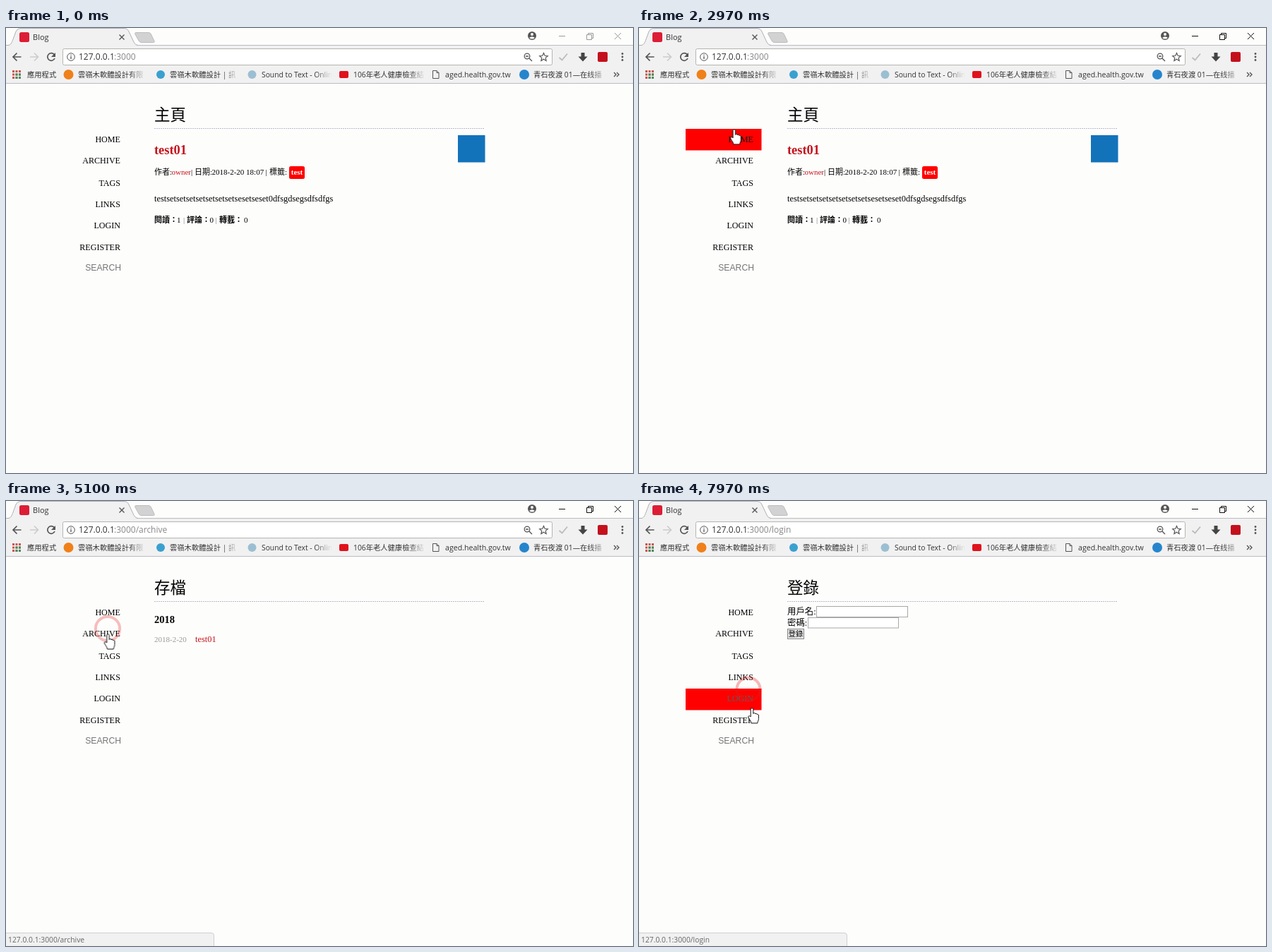
An HTML page that plays this animation: 888x631 px, repeating every 8 s.

```html
<!DOCTYPE html>
<html lang="zh-Hant">
<head>
<meta charset="utf-8">
<title>Blog</title>
<style>
html, body { margin: 0; width: 100%; height: 100%; overflow: hidden; background: #fdfdfc; }
svg { display: block; width: 888px; height: 631px; }
text { white-space: pre; }
.ui { font-family: "Open Sans", "Noto Sans CJK TC", "Noto Sans CJK", sans-serif; fill: #333; }
.doc { font-family: "Liberation Serif", "Noto Sans CJK TC", "Noto Sans CJK", serif; fill: #000; }
.line { fill: none; stroke: #555; }
.marks { font-size: 10.3px; }
.url { font-size: 12px; fill: #888; }
.hint text { font-size: 10.3px; fill: #666; }
.menu { font-size: 12.1px; text-anchor: end; }
.title { font-size: 22.5px; }
.meta { font-size: 11px; }
.body { font-size: 12.4px; }
.red { fill: #c4141c; }
.bold { font-weight: 700; }
.box { fill: #fff; stroke: #a9a9a9; }
.hot rect { fill: #f00; }

.home, .archive, .tags, .links, .login, .busy, .focus, .arrow, .hand, .hint, .hint g, .hot {
  visibility: hidden;
  animation: 8s step-end infinite;
}
.home { animation-name: home; }
.archive { animation-name: archive; }
.tags { animation-name: tags; }
.links { animation-name: links; }
.login { animation-name: login; }
.busy { animation-name: busy; }
.focus { animation-name: focus; }
.arrow { animation-name: arrow; }
.hand { animation-name: hand; }
.hint { animation-name: hint; }
.over-home { animation-name: over-home; }
.over-archive { animation-name: over-archive; }
.over-tags { animation-name: over-tags; }
.over-links { animation-name: over-links; }
.over-login { animation-name: over-login; }
.hot text { animation: 8s linear infinite; }
.over-home text { animation-name: ink-home; }
.over-archive text { animation-name: ink-archive; }
.over-tags text { animation-name: ink-tags; }
.over-links text { animation-name: ink-links; }
.over-login text { animation-name: ink-login; }

@keyframes home { 0% { visibility: visible } 61%, 100% { visibility: hidden } }
@keyframes archive { 0% { visibility: hidden } 61% { visibility: visible } 74.4%, 100% { visibility: hidden } }
@keyframes tags { 0% { visibility: hidden } 74.4% { visibility: visible } 84.5%, 100% { visibility: hidden } }
@keyframes links { 0% { visibility: hidden } 84.5% { visibility: visible } 97%, 100% { visibility: hidden } }
@keyframes login { 0% { visibility: hidden } 97%, 100% { visibility: visible } }
@keyframes focus { 0% { visibility: hidden } 26.1%, 100% { visibility: visible } }
@keyframes busy {
  0%, 32%, 48.1%, 61%, 74.4%, 84.5%, 97%, 100% { visibility: hidden }
  29.75%, 43.375%, 59.9%, 72.9%, 83.5%, 96.1% { visibility: visible }
}
@keyframes arrow {
  0%, 14.125%, 37.1%, 48.1%, 100% { visibility: hidden }
  7.875%, 17.2%, 43.375% { visibility: visible }
}
@keyframes hand {
  0%, 17.2%, 43.375% { visibility: hidden }
  14.125%, 37.1%, 48.1%, 100% { visibility: visible }
}
@keyframes hint {
  0%, 22.9% { visibility: hidden }
  16.8%, 37.9%, 100% { visibility: visible }
}
@keyframes over-home {
  0%, 17.2%, 51.6%, 100% { visibility: hidden }
  14.125%, 37.1% { visibility: visible }
}
@keyframes over-archive { 0%, 61%, 100% { visibility: hidden } 51.6% { visibility: visible } }
@keyframes over-tags { 0%, 74.4%, 100% { visibility: hidden } 65.7% { visibility: visible } }
@keyframes over-links { 0%, 84.5%, 100% { visibility: hidden } 76.7% { visibility: visible } }
@keyframes over-login { 0%, 97% { visibility: hidden } 87.3%, 97.5%, 100% { visibility: visible } }
@keyframes ink-home {
  0%, 14.125%, 17.21%, 37.1% { fill: #111 }
  17.2% { fill: #888 }
  43.3%, 100% { fill: #fff }
}
@keyframes ink-archive { 0%, 51.6% { fill: #111 } 57.8%, 100% { fill: #fff } }
@keyframes ink-tags { 0%, 65.7% { fill: #111 } 72%, 100% { fill: #fff } }
@keyframes ink-links { 0%, 76.9% { fill: #111 } 83%, 100% { fill: #fff } }
@keyframes ink-login { 0%, 87.3%, 97.5% { fill: #111 } 93.5%, 97% { fill: #fff } 100% { fill: #6a6a6a } }

/* status texts stay a little longer than the highlights */
.hint .over-home { animation-name: hint-home; }
.hint .over-archive { animation-name: hint-archive; }
.hint .over-tags { animation-name: hint-tags; }
.hint .over-links { animation-name: hint-links; }
.hint .over-login { animation-name: hint-login; }
@keyframes hint-home { 0%, 22.9%, 51.6%, 100% { visibility: hidden } 16.8%, 37.9% { visibility: visible } }
@keyframes hint-archive { 0%, 65.7%, 100% { visibility: hidden } 51.6% { visibility: visible } }
@keyframes hint-tags { 0%, 76.7%, 100% { visibility: hidden } 65.7% { visibility: visible } }
@keyframes hint-links { 0%, 87.3%, 100% { visibility: hidden } 76.7% { visibility: visible } }
@keyframes hint-login { 0% { visibility: hidden } 87.3%, 100% { visibility: visible } }

.cursor { animation: move 8s linear infinite; fill: #fff; stroke: #111; stroke-linejoin: round; }
@keyframes move {
  0%, 7.875% { transform: translate(522px, 590px) }
  10%, 12.125% { transform: translate(278px, 299px) }
  14.25% { transform: translate(166px, 170px) }
  15.625%, 16.5% { transform: translate(154.5px, 158px) }
  22.125%, 32.875% { transform: translate(62px, 37px) }
  37.5% { transform: translate(141px, 153px) }
  43.375%, 49.375% { transform: translate(141px, 155px) }
  52.5%, 60.6% { transform: translate(144px, 181px) }
  63.25%, 64.125% { transform: translate(144.5px, 189px) }
  66.625%, 75.25% { transform: translate(147px, 213px) }
  77.6%, 84.75% { transform: translate(154.5px, 249px) }
  87.5%, 97% { transform: translate(156px, 267px) }
  99.25%, 100% { transform: translate(160px, 294px) }
}

.rings circle {
  fill: none; stroke: #e81c1c; stroke-width: 4; opacity: 0;
  animation: ring 8s linear infinite;
}
@keyframes ring {
  0% { r: 7px; opacity: .75 }
  6.5% { r: 22px; opacity: .06 }
  6.51%, 100% { r: 22px; opacity: 0 }
}
.spin { transform-origin: 26px 13px; animation: spin 1s linear infinite; }
@keyframes spin { to { transform: rotate(360deg) } }
</style>
</head>
<body>
<svg viewBox="0 0 888 631">
  <defs>
    <linearGradient id="fade">
      <stop offset="0" stop-color="#f1f1f2" stop-opacity="0"/>
      <stop offset="1" stop-color="#f1f1f2"/>
    </linearGradient>
    <rect id="veil" y="58" width="24" height="17" fill="url(#fade)"/>
    <path id="controls" d="M783 11.5H792M822.5 9.5H829.5V16.5H822.5ZM824.5 9.5V7.5H831.5V14.5H829.5M862 7L871 16M871 7L862 16" fill="none"/>
  </defs>
  <rect width="888" height="631" fill="#fdfdfc"/>

  <!-- browser frame -->
  <g class="ui">
    <rect y="25" width="888" height="54" fill="#f1f1f2"/>
    <path d="M0 24.5H888M0 78.5H888" fill="none" stroke="#bcbcc2"/>
    <path d="M0 25H3C7 24 8 21 10 16L14 5Q16 .5 20 .5H167Q172 .5 174 5L181 20Q183 24.5 187 25V26H0Z" fill="#f1f1f2"/>
    <path d="M0 24.5H3C7 24 8 21 10 16L14 5Q16 .5 20 .5H167Q172 .5 174 5L181 20Q183 24.5 187 24.5" fill="none" stroke="#b0b0b4"/>
    <path d="M184 6.5H202Q204.5 6.5 205.5 9L210 18.5Q211 20.5 208.5 20.5H192Q189 20.5 188 18L183 9Q182 6.5 184 6.5Z" fill="#d2d2d3" stroke="#bcbcc0"/>
    <rect x="19" y="6" width="14" height="14" rx="2.5" fill="#dd1d35"/>
    <text x="38" y="17" font-size="11">Blog</text>
    <path d="M160.5 9.5L167.5 16.5M167.5 9.5L160.5 16.5" class="line" stroke-width="1.4"/>

    <circle cx="745" cy="11" r="6" fill="#555"/>
    <circle cx="745" cy="9" r="2" fill="#fdfdfd"/>
    <path d="M741 14Q745 10.5 749 14Q745 17 741 14Z" fill="#fdfdfd"/>
    <use href="#controls" stroke="#999"/>
    <use href="#controls" stroke="#111" class="focus"/>

    <g class="line" stroke-width="1.7">
      <path d="M21.5 41H10M15.5 35.5L10 41L15.5 46.5"/>
      <path d="M34 41H45.5M40 35.5L45.5 41L40 46.5" stroke="#ccc"/>
      <path d="M68.5 38A5.3 5.3 0 1 0 69 43"/>
    </g>
    <path d="M70 35V41H64Z" fill="#555"/>
    <rect x="80.5" y="29.5" width="693" height="23" rx="2" fill="#fff" stroke="#b4b4ae"/>
    <circle cx="92" cy="41" r="5.3" class="line"/>
    <path d="M92 40V44M92 37.7V39" class="line" stroke-width="1.3"/>
    <circle cx="738" cy="40" r="3.8" class="line" stroke-width="1.3"/>
    <path d="M741 43L745 47M736 40H740" class="line" stroke-width="1.4"/>
    <path d="M761.5 35.5L763.2 39.3L767.3 39.7L764.2 42.4L765.1 46.5L761.5 44.3L757.9 46.5L758.8 42.4L755.7 39.7L759.8 39.3Z" class="line" stroke-width="1.2"/>
    <path d="M783.5 42L787.5 45.5L795 36.5" fill="none" stroke="#bbb" stroke-width="1.8"/>
    <path d="M814.5 35H819.5V40.5H823.5L817 47.5L810.5 40.5H814.5Z" fill="#444"/>
    <rect x="838" y="34" width="14" height="14" rx="2" fill="#c4101c"/>
    <g fill="#555"><circle cx="873" cy="36.5" r="1.4"/><circle cx="873" cy="41" r="1.4"/><circle cx="873" cy="45.5" r="1.4"/></g>
    <text x="103" y="45" font-size="12">127.0.0.1</text>
  </g>

  <!-- bookmarks -->
  <g class="ui marks">
    <path d="M9 61.5H21M9 66H21M9 70.5H21" fill="none" stroke="#c9574c" stroke-width="3" stroke-dasharray="3 1.5"/>
    <path d="M13.5 66H21M13.5 70.5H21" fill="none" stroke="#4a8a5a" stroke-width="3" stroke-dasharray="3 1.5"/>
    <text x="30" y="70">應用程式</text>
    <circle cx="88.5" cy="66" r="7" fill="#f08019"/>
    <text x="102" y="70">雲嶺木軟體設計有限</text>
    <circle cx="219" cy="66" r="6" fill="#3aa0d0"/>
    <text x="232" y="70">雲嶺木軟體設計 | 訊</text>
    <circle cx="348.5" cy="66" r="6" fill="#9bbfd2"/>
    <text x="362" y="70">Sound to Text - Onlin</text>
    <rect x="472" y="61" width="13" height="10" rx="2" fill="#e0121c"/>
    <text x="492" y="70">106年老人健康檢查結</text>
    <path d="M604.5 60.5H610L613 63.5V71.5H604.5ZM610 60.5V63.5H613" class="line"/>
    <text x="622" y="70" font-size="10.6">aged.health.gov.tw</text>
    <circle cx="734" cy="66" r="7" fill="#2585cc"/>
    <text x="747" y="70" lang="zh-Hans">青石夜渡 01—在线播</text>
    <use href="#veil" x="174"/>
    <use href="#veil" x="306"/>
    <use href="#veil" x="438"/>
    <use href="#veil" x="570"/>
    <use href="#veil" x="826"/>
    <path d="M861 63L864 66L861 69M865 63L868 66L865 69" class="line" stroke-width="1.4"/>
  </g>

  <g class="busy">
    <rect x="18" y="5" width="16" height="16" fill="#f1f1f2"/>
    <path class="spin" d="M25 8.2A5 5 0 0 1 27 8.2" fill="none" stroke="#888" stroke-width="1.3"/>
    <rect x="56" y="33" width="16" height="16" fill="#f1f1f2"/>
    <path d="M59 36L69 46M69 36L59 46" class="line" stroke-width="1.7"/>
  </g>

  <!-- pages -->
  <path d="M210 142.5H678" fill="none" stroke="#b9b9d2" stroke-dasharray="2 1"/>
  <g class="home doc">
    <text x="153" y="45" class="ui url">:3000</text>
    <text x="210" y="131" class="title">主頁</text>
    <rect x="640" y="152" width="38.5" height="38.5" fill="#1373ba"/>
    <text x="210" y="179" class="red bold" font-size="18.4">test01</text>
    <g class="meta">
      <text x="210" y="208">作者:</text>
      <text x="234.5" y="208" class="red">owner</text>
      <text x="262" y="208">|</text>
      <text x="267" y="208">日期:</text>
      <text x="291.5" y="208">2018-2-20 18:07</text>
      <text x="367.5" y="208">|</text>
      <text x="373" y="208">標籤:</text>
      <rect x="401" y="196" width="22" height="18" rx="2.5" fill="#f00"/>
      <text x="403.8" y="208" class="bold" fill="#fff">test</text>
    </g>
    <text x="210" y="246" class="body">testsetsetsetsetsetsetsetsesetseset0dfsgdsegsdfsdfgs</text>
    <g class="meta">
      <text x="210" y="276" class="bold">閱讀：</text>
      <text x="242" y="276">1</text>
      <text x="251" y="276" fill="#777">|</text>
      <text x="256" y="276" class="bold">評論：</text>
      <text x="288.5" y="276">0</text>
      <text x="296.5" y="276" fill="#777">|</text>
      <text x="302" y="276" class="bold">轉載：</text>
      <text x="337" y="276">0</text>
    </g>
  </g>
  <g class="archive doc">
    <text x="153" y="45" class="ui url">:3000/archive</text>
    <text x="210" y="131" class="title">存檔</text>
    <text x="210" y="173" class="bold" font-size="14.5">2018</text>
    <text x="210" y="200" class="meta" fill="#999">2018-2-20</text>
    <text x="268" y="200" class="body red">test01</text>
  </g>
  <g class="tags doc">
    <text x="153" y="45" class="ui url">:3000/tags</text>
    <text x="210" y="131" class="title">標籤</text>
    <rect x="221" y="151" width="23" height="13" rx="2" fill="#e80000"/>
    <text x="225" y="160.5" font-size="9.5" font-family="Liberation Sans, sans-serif" fill="#fff">test</text>
  </g>
  <g class="links doc">
    <text x="153" y="45" class="ui url">:3000/links</text>
    <text x="210" y="131" class="title">連結</text>
  </g>
  <g class="login doc">
    <text x="153" y="45" class="ui url">:3000/login</text>
    <text x="210" y="131" class="title">登錄</text>
    <text x="210" y="161" class="body">用戶名:</text>
    <rect x="251.5" y="149.5" width="129" height="15" class="box"/>
    <text x="210" y="177" class="body">密碼:</text>
    <rect x="239.5" y="165.5" width="128" height="14.5" class="box"/>
    <rect x="210.5" y="181.5" width="23" height="14" fill="#e6e6e6" stroke="#888"/>
    <text x="211.5" y="192" font-size="10.5">登錄</text>
  </g>

  <!-- menu -->
  <g class="doc menu">
    <text x="162" y="162">HOME</text>
    <text x="162" y="192">ARCHIVE</text>
    <text x="162" y="223.5">TAGS</text>
    <text x="162" y="254">LINKS</text>
    <text x="162" y="284">LOGIN</text>
    <text x="162" y="315">REGISTER</text>
    <text x="163" y="344" font-size="12.2" font-family="Liberation Sans, sans-serif" fill="#757575">SEARCH</text>
    <g class="hot over-home"><rect x="66" y="143" width="107.5" height="30.5"/><text x="162" y="162">HOME</text></g>
    <g class="hot over-archive"><rect x="66" y="173.5" width="107.5" height="30.5"/><text x="162" y="192">ARCHIVE</text></g>
    <g class="hot over-tags"><rect x="66" y="204" width="107.5" height="31"/><text x="162" y="223.5">TAGS</text></g>
    <g class="hot over-links"><rect x="66" y="235" width="107.5" height="31"/><text x="162" y="254">LINKS</text></g>
    <g class="hot over-login"><rect x="66" y="266" width="107.5" height="30.5"/><text x="162" y="284">LOGIN</text></g>
  </g>

  <!-- status bar -->
  <g class="hint ui">
    <path d="M-1 612.5H291Q294.5 612.5 294.5 616V632H-1Z" fill="#f1f1f2" stroke="#cfcfd3"/>
    <g class="over-home"><text x="3" y="626">127.0.0.1:3000</text></g>
    <g class="over-archive"><text x="3" y="626">127.0.0.1:3000/archive</text></g>
    <g class="over-tags"><text x="3" y="626">127.0.0.1:3000/tags</text></g>
    <g class="over-links"><text x="3" y="626">127.0.0.1:3000/links</text></g>
    <g class="over-login"><text x="3" y="626">127.0.0.1:3000/login</text></g>
  </g>

  <!-- clicks and pointer -->
  <g class="rings">
    <circle cx="58.5" cy="37" style="animation-delay:2.08s"/>
    <circle cx="144" cy="152" style="animation-delay:3.05s"/>
    <circle cx="144" cy="181" style="animation-delay:4.75s"/>
    <circle cx="147" cy="215" style="animation-delay:5.77s"/>
    <circle cx="155" cy="251" style="animation-delay:6.62s"/>
    <g class="login"><circle cx="155" cy="267" style="animation-delay:7.64s"/></g>
  </g>
  <g class="cursor">
    <path class="arrow" d="M0 0V14L3.2 11L5.4 16L7.7 15L5.5 10.2H9.8Z"/>
    <path class="hand" d="M-1.8 1.5C-1.8-.6 1.8-.6 1.8 1.5V7.5C2.2 6 4.6 6.2 4.8 8C5.2 6.8 7 7 7.2 8.8C7.8 7.8 9.4 8.3 9.4 10V14.5C9.4 18 7.8 18.5 7.8 21H-1C-1 18.5-3.5 16-5 13C-6 11-3.6 9.6-1.8 12Z"/>
  </g>
</svg>
</body>
</html>
```
